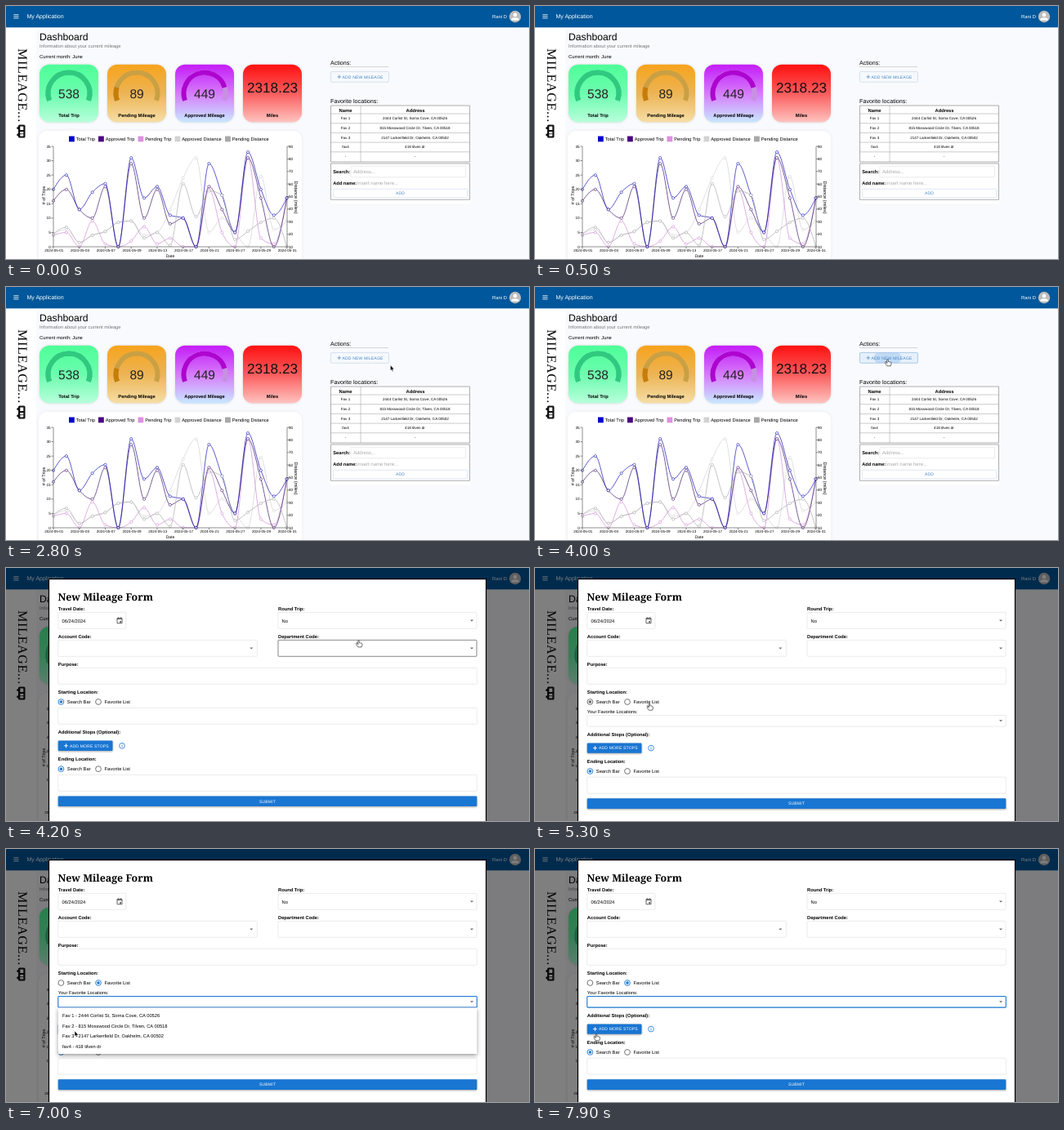
Animation of 640 by 310 pixels, one loop 8 s. Source, as an HTML page:

```html
<!DOCTYPE html>
<html lang="en">
<head>
<meta charset="utf-8">
<title>Mileage dashboard</title>
<style>
html, body { margin: 0; width: 100%; height: 100%; overflow: hidden; background: #fff; }
svg { display: block; width: 640px; height: 310px; text-rendering: geometricPrecision;
  font-family: "Liberation Sans", Arial, sans-serif; }
.b { font-weight: 700; }
.m { text-anchor: middle; }
.e { text-anchor: end; }
.btn { font-size: 5.07px; letter-spacing: .0286em; }
.soft { filter: drop-shadow(0 1px 1px rgba(0,0,0,.35)); }
.card { filter: drop-shadow(0 0 1.5px rgba(0,0,0,.14)); }
.menu { filter: drop-shadow(0 2px 2.5px rgba(0,0,0,.4)); }
</style>
</head>
<body>
<svg id="stage" viewBox="0 0 640 310"></svg>
<script>
const BLUE = '#1976d2', LINK = '#4483c8', PALE = '#e3e3e3';
const TOTAL = '#1414b4', APPROVED = '#43186a', PENDING = '#cf8bd6', LIGHT = '#d3d3d3', GRAY = '#a9a9a9';
const text = (x, y, s, size = 5.75, attrs = '') =>
  `<text x="${x}" y="${y}" font-size="${size}" ${attrs}>${s}</text>`;
const bold = (x, y, s, size = 5.75, cls = '') => text(x, y, s, size, `class="b ${cls}"`);
const rect = (x, y, w, h, fill, attrs = '') =>
  `<rect x="${x}" y="${y}" width="${w}" height="${h}" fill="${fill}" ${attrs}/>`;
const path = (d, stroke, w = 1, attrs = '') =>
  `<path d="${d}" fill="none" stroke="${stroke}" stroke-width="${w}" ${attrs}/>`;
const box = (x, y, w, h, stroke = PALE, attrs = '') =>
  rect(x, y, w, h, 'none', `stroke="${stroke}" stroke-width=".7" rx="1" ${attrs}`);

const places = [
  ['Fav 1', '2444 Corlist St, Sorna Cove, CA 00526'],
  ['Fav 2', '815 Mosswood Circle Dr, Tilven, CA 00518'],
  ['Fav 3', '2147 Larkenfield Dr, Oakhelm, CA 00502'],
  ['fav4', '418 tilven dr'],
];

// ---- dashboard ----
function header() {
  return rect(0, 0, 640, 26, '#01579b') + rect(0, 26, 640, 1, '#b4d0e6') +
    path('M9.3 10.7h6.2M9.3 12.8h6.2M9.3 14.9h6.2', '#fff', .8) +
    text(25.5, 15.4, 'My Application', 7, 'fill="#fff"') +
    text(595, 15.2, 'Rani D', 5.85, 'fill="#fff"') +
    '<circle cx="623" cy="13" r="7.2" fill="#bdbdbd"/><circle cx="623" cy="10.9" r="2.3" fill="#fff"/>' +
    '<path d="M618.4 17.6v-1q0-2.4 4.6-2.4t4.6 2.4v1z" fill="#fff"/>';
}

function logo() {
  return '<text transform="translate(14.5 52) rotate(90)" font-size="16" letter-spacing=".7" ' +
    'font-family="Liberation Serif, serif">MILEAGE...</text>' +
    rect(15, 145.5, 8.5, 16, '#111', 'rx="1.5"') + rect(17.3, 147.5, 4, 4.5, '#fff') +
    rect(17.3, 154, 4, 5.5, '#fff') + path('M17 156.7h4.5', '#111', .8) +
    '<circle cx="14.8" cy="149.5" r="1.6" fill="#111"/><circle cx="14.8" cy="157.8" r="1.6" fill="#111"/>';
}

function arc(cx, cy, from, to, color) {
  const at = deg => {
    const a = deg * Math.PI / 180;
    return `${cx + 25.5 * Math.sin(a)} ${cy - 25.5 * Math.cos(a)}`;
  };
  return path(`M${at(from)}A25.5 25.5 0 ${to - from > 180 ? 1 : 0} 1 ${at(to)}`, color, 6);
}

function card(i, label, value, top, mid, low, track, fill, share) {
  const x = 41 + i * 83, cx = x + 36;
  let s = `<linearGradient id="c${i}" x2="0" y2="1"><stop stop-color="${top}"/>` +
    `<stop offset=".5" stop-color="${mid}"/><stop offset="1" stop-color="${low}"/></linearGradient>` +
    rect(x, 71.7, 72, 70.8, `url(#c${i})`, 'rx="12" class="card"');
  if (track) {
    s += arc(cx, 107, -110, 110, track) + arc(cx, 107, -110, -110 + 220 * share, fill) +
      text(cx, 112.8, value, 15.5, 'class="m" fill="#222"');
  } else s += text(cx, 106.3, value, 17.2, 'class="m" fill="#111"');
  return s + bold(cx, 136, label, 5.75, 'm');
}

// Monotone cubic curve through evenly spaced values.
function curve(values, color) {
  const step = 15.87, px = i => 58 + i * step, py = v => 295 - v * 3.514;
  const n = values.length, d = i => values[i + 1] - values[i];
  const inner = i => {
    const a = d(i - 1), b = d(i);
    return (Math.sign(a) + Math.sign(b)) * Math.min(Math.abs(a), Math.abs(b), Math.abs(a + b) / 4);
  };
  const slope = i => i === 0 ? (3 * d(0) - inner(1)) / 2
    : i === n - 1 ? (3 * d(n - 2) - inner(n - 2)) / 2 : inner(i);
  let line = `M58 ${py(values[0])}`, dots = '';
  values.forEach((v, i) => {
    if (i) line += `C${px(i - 1) + step / 3} ${py(values[i - 1] + slope(i - 1) / 3)} ` +
      `${px(i) - step / 3} ${py(v - slope(i) / 3)} ${px(i)} ${py(v)}`;
    dots += `<circle cx="${px(i)}" cy="${py(v)}" r="1.6" fill="#fff" stroke="${color}" stroke-width=".6"/>`;
  });
  return path(line, color, .7) + dots;
}

function chart() {
  let s = rect(40, 153, 322, 165, '#fff', 'rx="10" style="filter:drop-shadow(0 0 2px rgba(0,0,0,.06))"');
  [[77, 'Total Trip', '#0000cd'], [113, 'Approved Trip', '#4b0082'], [161.5, 'Pending Trip', '#dd8fe0'],
   [206.5, 'Approved Distance', LIGHT], [268, 'Pending Distance', GRAY]]
    .forEach(([x, name, color]) => s += rect(x, 159.5, 6.8, 6.8, color) + text(x + 8.7, 165, name, 5.75));
  s += curve([4.5, 6, 1.5, 4, 5.2, 8.5, 9, 4, 5, 13, 24, 31, 5, 10, 5, 0, 24.5, 6, 9], LIGHT);
  s += curve([4, 5, 0, 9, 1, 0, 2, 7, 1, 3, 0, 0, 20, 5, 0, 31, 3, 1, 17], PENDING);
  s += curve([16, 20, 13, 10, 21, 0, 29, 10, 20, 8, 10, 0, 21, 13, 5, 31, 17, 0, 17], APPROVED);
  s += curve([20, 25, 13, 19, 22, 0, 31, 17, 21, 11, 10, 0, 29, 18, 5, 33, 20, 11, 17], TOTAL);
  s += curve([4.5, 6.8, 1.5, 4, 5.4, 8.5, 9, 3, 5, .5, 22, 10.5, 19.5, 18, 2.5, 5.4, 8.5, 10, 0], GRAY);
  let axes = 'M58 172V295H344V172';
  for (let i = 0; i < 8; i++) {
    const y = 295 - i * 17.57;
    axes += `M58 ${y}h-2.5`;
    s += text(54.7, y + 1.6, i * 5, 4.6, 'class="e"');
  }
  for (let i = 0; i < 9; i++) {
    const y = 295 - i * 15.375;
    axes += `M344 ${y}h2.5`;
    s += text(346, y + 1.6, 10 + i * 10, 4.6);
  }
  ['01', '03', '07', '09', '13', '17', '21', '27', '29', '31'].forEach((day, i) => {
    const x = 58 + i * 31.74;
    axes += `M${x} 295v2.5`;
    s += text(x + .7, 301.3, '2024-05-' + day, 4.5, 'class="m"');
  });
  return s + path(axes, '#444', .6) + text(201, 308.3, 'Date', 5, 'class="m"') +
    text(0, 0, '# of Trips', 5.5, 'class="m" transform="translate(48 232) rotate(-90)"') +
    text(0, 0, 'Distance (miles)', 5.6, 'class="m" transform="translate(353 234.5) rotate(90)"');
}

function side() {
  let s = text(397, 72, 'Actions:', 7.1) + path('M397 74.5H468', '#bbb', .6) +
    rect(397.4, 80.4, 71, 12.8, '#f6f9fc', `id="add" rx="1.5" stroke="#c6d6ea" stroke-width=".7"`) +
    rect(415, 80.7, 33, 12.2, BLUE, 'id="ripple" opacity=".18" rx="5"') +
    path('M405.5 86.8h4.6M407.8 84.5v4.6', LINK, .7) +
    text(411.5, 88.6, 'ADD NEW MILEAGE', 5.07, `class="btn" fill="${LINK}"`) +
    text(397, 118.5, 'Favorite locations:', 7.2) + rect(397, 121.5, 171, 121, '#fff');
  let grid = 'M434 122V191';
  for (let i = 0; i < 5; i++) grid += `M397.5 ${132 + i * 11.7}H567.5`;
  s += path(grid, '#999', .5) + path('M397.5 122H567.5V191H397.5ZM397.5 193H567.5V237.3H397.5Z', '#777', .6) +
    bold(415.5, 129.8, 'Name', 5.85, 'm') + bold(501, 129.8, 'Address', 5.75, 'm');
  [...places, ['-', '-']].forEach(([name, address], i) => {
    const y = 139 + i * 11.8;
    s += text(415.5, y, name, 4.55, 'class="m"') + text(500.5, y, address, 4.55, 'class="m"');
  });
  return s + bold(400.3, 205, 'Search:', 5.7) + box(422, 196.3, 140.5, 13.5) +
    text(425, 205.2, 'Address...', 6, 'fill="#aaa"') +
    bold(400.3, 218.8, 'Add name:', 5.6) + text(430, 218.8, 'insert name here...', 6, 'fill="#aaa"') +
    box(400.5, 224.2, 164, 10.6, '#d3e0ef') +
    text(482.5, 231.3, 'ADD', 5.07, `class="btn m" fill="${LINK}"`);
}

const dashboard = rect(0, 0, 640, 310, '#fff') + rect(37, 26, 603, 284, '#f9fafd') + header() + logo() +
  text(41, 42, 'Dashboard', 12.2) +
  text(41, 50.8, 'Information about your current mileage', 5.8, 'fill="#777"') +
  text(41, 63.8, 'Current month: June', 5.8) +
  card(0, 'Total Trip', '538', '#4dff98', '#6cfcae', '#b8ffdb', '#31c980', '#31c980', 1) +
  card(1, 'Pending Mileage', '89', '#f7a31c', '#ecb455', '#f6dea6', '#caa044', '#c77d08', .165) +
  card(2, 'Approved Mileage', '449', '#c41cf8', '#d67bfa', '#c8e8ff', '#c691e0', '#ae05d0', .835) +
  card(3, 'Miles', '2318.23', '#ff1010', '#fa5c5c', '#ffc4c0') +
  chart() + side();

// ---- form ----
const arrow = (x, y) => `<path d="M${x - 2} ${y - 1}h4l-2 2z" fill="#666"/>`;
const radio = (x, y, id, on) => `<g id="${id}"><circle cx="${x}" cy="${y}" r="3.4" fill="none" ` +
  `stroke="${on ? BLUE : '#666'}" stroke-width=".9"/><circle cx="${x}" cy="${y}" r="1.8" fill="${BLUE}" ` +
  `opacity="${on ? 1 : 0}"/></g>`;
const radios = (y, id) => radio(67.4, y, id + 'Bar', true) + radio(113, y, id + 'Fav', false) +
  text(74.8, y + 2, 'Search Bar') + text(120.6, y + 2, 'Favorite List');

const form = rect(52.5, 13.5, 535, 310, '#fff', 'stroke="#000" stroke-width="1.2"') +
  text(63.5, 39.8, 'New Mileage Form', 12.4, 'class="b" font-family="Noto Serif, serif"') +
  bold(63.8, 52, 'Travel Date:') + box(63.8, 54.3, 83, 20) + text(68.5, 66.5, '06/24/2024') +
  path('M136 61.5h6v6.2h-6zM136 62.7h6M137.4 60.2v1.4M140.6 60.2v1.4', '#555', .9) +
  rect(139.2, 65, 1.8, 1.8, '#555') +
  bold(333, 52, 'Round Trip:') + box(333, 54.3, 243, 20) + text(337.5, 66.5, 'No') + arrow(570, 64.5) +
  bold(63.8, 86, 'Account Code:') + box(63.8, 88.3, 243.5, 20) + arrow(300.3, 98.5) +
  bold(333, 86, 'Department Code:') + box(333, 88.3, 243, 20, PALE, 'id="dept"') + arrow(570, 98.5) +
  bold(63.8, 120, 'Purpose:') + box(63.8, 122.3, 512.5, 20) +
  bold(63.8, 154.3, 'Starting Location:') + radios(164, 'start') +
  `<g id="search">${box(63.8, 171.3, 512.5, 20)}</g>` +
  `<g id="favs">${text(63.8, 178, 'Your Favorite Locations:')}` +
  box(63.8, 180.5, 512.5, 13.6, PALE, 'id="pick"') + arrow(570, 187.3) + '</g>' +
  '<g id="lower">' + bold(63.8, 203.2, 'Additional Stops (Optional):') +
  rect(63.8, 211.6, 66.7, 12.4, BLUE, 'rx="1" class="soft"') +
  path('M71 217.8h5M73.5 215.3v5', '#fff', .9) +
  text(78, 219.6, 'ADD MORE STOPS', 5.07, 'class="btn" fill="#fff"') +
  path('M138.6 217.8a3.4 3.4 0 1 0 6.8 0a3.4 3.4 0 1 0-6.8 0M142 217.2v2.4M142 215.7v.8', BLUE, .8) +
  bold(63.8, 236.2, 'Ending Location:') + radios(246.2, 'end') + box(63.8, 253.4, 512.5, 20) +
  rect(63.8, 279.5, 512.5, 12.6, BLUE, 'rx="1" class="soft"') +
  text(320, 287.5, 'SUBMIT', 5.07, 'class="btn m" fill="#fff"') + '</g>' +
  '<g id="menu">' + rect(63.8, 194.5, 512.5, 56.5, '#fff', 'rx="1" class="menu"') +
  places.map((p, i) => text(69, 205.8 + i * 12.8, p.join(' - '))).join('') + '</g>';

const pointer = '<path id="arrow" d="M0 0V6.6L1.5 5.3L2.5 7.6L3.6 7.1L2.6 4.9H4.7Z" fill="#000" ' +
  'stroke="#fff" stroke-width=".5"/>' +
  '<path id="hand" d="M-.7 .3Q0-.5 .7 .3V3Q1.6 2.5 2 3.3Q2.9 2.8 3.3 3.6Q4.3 3.4 4.4 4.4V6L3.6 8.2H-.7' +
  'L-2.7 5.4Q-3-.1-.7 5Z" fill="#fff" stroke="#111" stroke-width=".6" stroke-linejoin="round"/>';

const stage = document.getElementById('stage');
stage.innerHTML = dashboard + `<g id="modal">${rect(0, 0, 640, 310, '#000', 'opacity=".5"')}${form}</g>` +
  `<g id="cursor">${pointer}</g>`;

// ---- motion ----
const el = {};
stage.querySelectorAll('[id]').forEach(n => el[n.id] = n);
const show = (id, on) => el[id].style.display = on ? '' : 'none';
const ramp = (t, from, span) => Math.max(0, Math.min(1, (t - from) / span));
const within = (t, a, b) => t >= a && t < b;

const track = [
  [1000, 481, 101], [1500, 476, 97], [2600, 476, 97], [3500, 431.5, 88], [4200, 431.5, 88.7],
  [5200, 140, 166], [5400, 140, 166], [5800, 128.5, 189.5], [6300, 126, 192], [6800, 108, 222],
  [7200, 60, 224], [7400, 60, 226], [7800, 75, 226.5], [8000, 75, 226.5],
];
function cursorAt(t) {
  const i = Math.max(1, track.findIndex(k => k[0] > t));
  const [a, b] = [track[i - 1], track[i]];
  const u = ramp(t, a[0], b[0] - a[0]), e = u * u * (3 - 2 * u);
  return [a[1] + (b[1] - a[1]) * e, a[2] + (b[2] - a[2]) * e];
}

function setRadio(id, color, dot) {
  const [ring, core] = el[id].children;
  ring.setAttribute('stroke', color);
  core.setAttribute('fill', color);
  core.setAttribute('opacity', dot);
}

function draw(t) {
  const [x, y] = cursorAt(t);
  const hand = within(t, 3400, 4500) || within(t, 5100, 5500) || t >= 7600;
  show('cursor', t >= 1000);
  el.cursor.setAttribute('transform', `translate(${x} ${y})`);
  show('hand', hand);
  show('arrow', !hand);

  const hover = within(t, 3400, 4100);
  el.add.setAttribute('fill', hover ? '#e6f0fb' : '#f6f9fc');
  el.add.setAttribute('stroke', hover ? '#8fb5e0' : '#c6d6ea');
  show('ripple', within(t, 4000, 4200));
  el.modal.setAttribute('opacity', ramp(t, 4050, 150));
  show('modal', t > 4050);

  const onDept = t >= 4100 && x > 333 && x < 576 && y > 88 && y < 108;
  el.dept.setAttribute('stroke', onDept ? '#555' : PALE);

  const list = t >= 5250, swapped = t >= 5400;
  show('search', !list);
  show('favs', list);
  el.lower.setAttribute('transform', `translate(0 ${list ? 2.8 : 0})`);
  setRadio('startBar', list ? '#666' : BLUE, swapped ? 0 : 1);
  setRadio('startFav', swapped ? BLUE : '#666', swapped ? 1 : 0);

  const focused = t >= 5750;
  el.pick.setAttribute('stroke', focused ? BLUE : PALE);
  el.pick.setAttribute('stroke-width', focused ? 1.1 : .7);
  const open = Math.min(ramp(t, 5750, 165), 1 - ramp(t, 7250, 200));
  el.menu.setAttribute('opacity', open);
  show('menu', open > 0);
}

function tick(now) {
  draw(Math.floor(now % 8000 / 100) * 100);
  requestAnimationFrame(tick);
}
draw(0);
requestAnimationFrame(tick);
</script>
</body>
</html>
```
